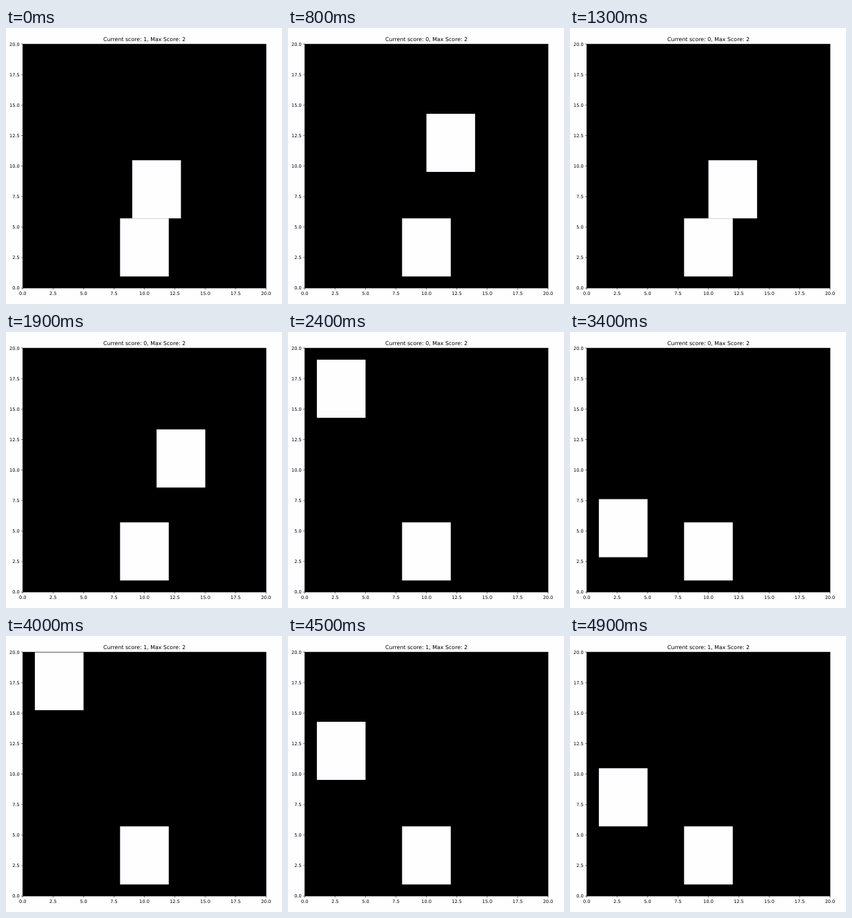
These frames come from a looping animation (400x399 px, 5000 ms). An HTML page:

```html
<!DOCTYPE html>
<html lang="en">
<head>
<meta charset="utf-8">
<title>Falling block game</title>
<style>
  html, body { margin: 0; width: 100%; height: 100%; overflow: hidden; background: #fefdff; }
  svg { display: block; width: 400px; height: 399px; }
  text { font: 6.56px "DejaVu Sans", sans-serif; fill: #000; }
  #title { font-size: 7.87px; }
</style>
</head>
<body>
<svg id="stage" viewBox="0 0 400 399"></svg>
<script>
const STEP = 100, STEPS = 50;
const LEFT = 24.2, TOP = 23.2, SIZE = 352.8;
const COLS = 20, ROWS = 21;
const cellW = SIZE / COLS, cellH = SIZE / ROWS;
const stage = document.getElementById("stage");

// Each run falls one row per step: [first step, column, first row, score]
const RUNS = [
  [0, 9, 10, 1],
  [1, 10, 0, 0], [3, 10, 1, 0], [10, 10, 7, 0],
  [14, 11, 0, 0], [16, 11, 3, 0], [18, 11, 6, 0],
  [23, 1, 15, 0], [24, 1, 1, 0], [34, 1, 13, 0], [35, 1, 11, 0],
  [40, 1, 0, 1], [44, 1, 5, 1]
];

function add(tag, attrs, text = "") {
  const node = document.createElementNS("http://www.w3.org/2000/svg", tag);
  for (const key in attrs) node.setAttribute(key, attrs[key]);
  node.textContent = text;
  return stage.appendChild(node);
}

function addBlock() {
  return add("rect", { width: 4 * cellW, height: 5 * cellH, fill: "#fefdff" });
}

function place(block, col, row) {
  block.setAttribute("x", LEFT + col * cellW);
  block.setAttribute("y", TOP + row * cellH);
}

add("rect", { x: LEFT, y: TOP, width: SIZE, height: SIZE });
const player = addBlock();
const obstacle = addBlock();
place(player, 8, 15);

const bottom = TOP + SIZE;
add("rect", { x: LEFT, y: TOP, width: SIZE, height: SIZE,
  fill: "none", stroke: "#000", "stroke-width": 0.55 });

for (let value = 0; value <= 20; value += 2.5) {
  const offset = value / 20 * SIZE;
  const x = LEFT + offset, y = bottom - offset;
  add("path", { d: `M${x} ${bottom}v2.3M${LEFT} ${y}h-2.3`,
    stroke: "#000", "stroke-width": 0.55 });
  add("text", { x, y: bottom + 9.8, "text-anchor": "middle" }, value.toFixed(1));
  add("text", { x: LEFT - 4.6, y: y + 2.4, "text-anchor": "end" }, value.toFixed(1));
}

const title = add("text", { id: "title", x: LEFT + SIZE / 2, y: 19.2, "text-anchor": "middle" });

function draw(now) {
  const step = Math.floor(now / STEP) % STEPS;
  const [start, col, row, score] = RUNS.findLast(run => run[0] <= step);
  place(obstacle, col, row + step - start);
  title.textContent = `Current score: ${score}, Max Score: 2`;
}

function tick() {
  draw(performance.now());
  requestAnimationFrame(tick);
}
tick();
</script>
</body>
</html>
```
